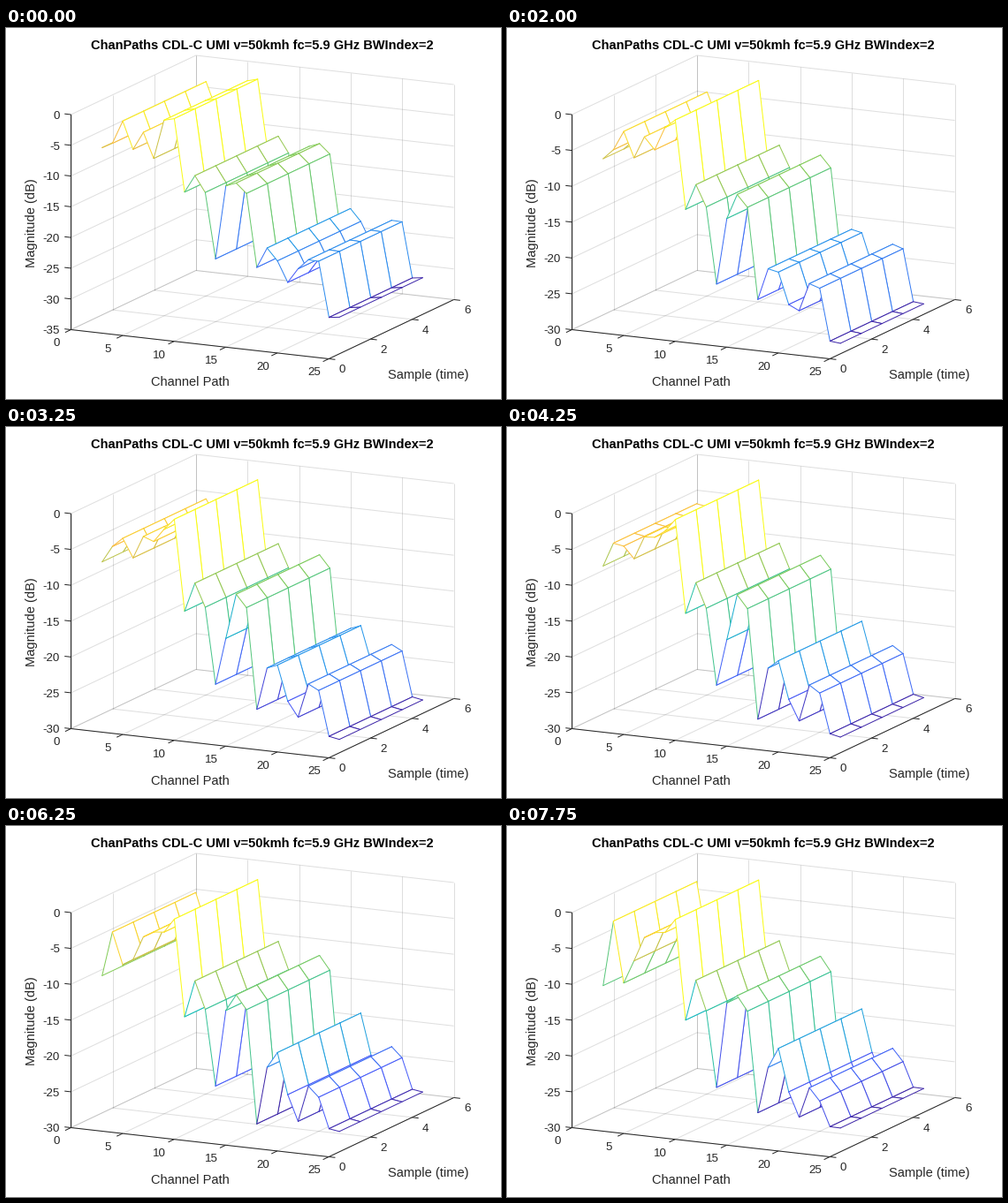
Recreate the animation shown at these times as a matplotlib script. Size 560 by 420 pixels, loop 8 s.

```python
import numpy as np
import matplotlib.pyplot as plt
from matplotlib.animation import FuncAnimation
from matplotlib.collections import LineCollection, PolyCollection
from matplotlib.colors import LinearSegmentedColormap

W, H, DPI = 560, 420, 100
FRAMES, STEP_MS = 32, 250
PX = 72 / DPI
INK = "#262626"
plt.rcParams["font.family"] = "Liberation Sans"

# Oblique axes: screen position of the origin and of one unit along each axis
ORIGIN = np.array([73.0, 341.0])
X_UNIT = np.array([291.7, 33.0]) / 25
Y_UNIT = np.array([141.4, -67.0]) / 6
Z_HEIGHT = 243.5
TICK = 7.3

PARULA = LinearSegmentedColormap.from_list("parula", [
    "#3e26a8", "#475bf9", "#2797eb", "#12beb9", "#81cc59", "#fbbc3d", "#f9fb15"])

# Gain of each path in dB at the start, and its drift over the loop
START = np.array([-6.8, -5.9, -2.1, -6.5, -3.55, -7.6, -1.2, -0.75,
                  -12.5, -9.65, -12.2, -22.8, -10.5, -10.1, -11.6, -23.3,
                  -20.1, -22, -25.3, -22.9, -21.25, -21.3, -30.25, -30.02])
DRIFT = np.array([-4.6, 3.65, -8.6, -0.95, -0.5, 4.4, -1.8, -0.3,
                  -2.4, 0.45, -1.1, -1, -1.2, -0.6, -1.1, -0.7,
                  -0.1, 4.6, 2, -3.75, -1.15, -2.8, 2.75, 2.5])
# Paths that arc away from a straight drift: height at mid loop
BOW = {1: 0.8, 2: -1.3, 3: 1.4, 6: 1.5, 7: -0.5, 18: 0.5, 20: -2.1, 23: 0.4}
# Paths that pass through a deep fade: centre, width, depth
FADE = {13: (0.485, 0.19, 6), 16: (0.72, 0.27, 4.6)}

PATHS = np.arange(1, 25)
SAMPLES = np.arange(1, 6)


def gains(u):
    """Gains in dB at loop position u in 0..1."""
    db = START + DRIFT * u
    for p, height in BOW.items():
        db[p - 1] += height * 4 * u * (1 - u)
    for p, (centre, width, depth) in FADE.items():
        db[p - 1] -= depth * np.exp(-((u - centre) / width) ** 2 / 2)
    return db


def project(x, y, height=0.0):
    """Screen point; height runs from 0 at the floor to 1 at the top."""
    return ORIGIN + x * X_UNIT + y * Y_UNIT - np.array([0, height * Z_HEIGHT])


def along(point, direction):
    return [point, point + TICK * direction / np.hypot(*direction)]


fig = plt.figure(figsize=(W / DPI, H / DPI), dpi=DPI, facecolor="white")
ax = fig.add_axes([0, 0, 1, 1])
ax.set_xlim(-0.5, W - 0.5)
ax.set_ylim(H - 0.5, -0.5)
ax.axis("off")


def label(x, y, text, px=13.33, ha="left", **kw):
    kw = {"color": INK, **kw}
    return ax.text(x, y, text, fontsize=px * PX, ha=ha, va="baseline",
                   rotation_mode="anchor", **kw)


def lines(segments, zorder, **kw):
    return ax.add_collection(LineCollection(
        segments, colors=INK, linewidths=PX, zorder=zorder, **kw))


# Fixed grid, axes and ticks
grid, ticks = [], []
for x in range(0, 26, 5):
    grid += [[project(x, 0), project(x, 6)], [project(x, 6), project(x, 6, 1)]]
    foot = project(x, 0)
    ticks.append(along(foot, -Y_UNIT))
    label(foot[0] - 16.5, foot[1] + 19, str(x), ha="center")
for y in range(0, 7, 2):
    grid += [[project(0, y), project(25, y)], [project(0, y), project(0, y, 1)]]
    foot = project(25, y)
    ticks.append(along(foot, X_UNIT))
    label(foot[0] + 11.5, foot[1] + 16, str(y))
lines(grid, 1, alpha=0.15)
lines(ticks, 2)
lines([[project(0, 0, 1), project(0, 0), project(25, 0), project(25, 6)]], 2)

z_grid = lines([], 1, alpha=0.15)
z_ticks = lines([], 2)
z_labels = [label(60.5, 0, str(-5 * i), ha="right") for i in range(8)]

label(289.5, 24, "ChanPaths CDL-C UMI v=50kmh fc=5.9 GHz BWIndex=2", 14.67,
      "center", color="black", weight="bold")
label(208, 405, "Channel Path", 14.67, "center")
label(477.5, 397, "Sample (time)", 14.67, "center")
label(33, 220.5, "Magnitude (dB)", 14.67, "center", rotation=90)

mesh = PolyCollection([], closed=False, linewidths=PX, zorder=3,
                      capstyle="round", joinstyle="round")
ax.add_collection(mesh)


def draw_z_axis(floor):
    walls, marks = [], []
    for i, text in enumerate(z_labels):
        level = 1 + 5 * i / floor
        text.set_visible(level > -0.01)
        if level < -0.01:
            continue
        walls.append([project(0, 0, level), project(0, 6, level),
                      project(25, 6, level)])
        foot = project(0, 0, level)
        marks.append(along(foot, -X_UNIT))
        text.set_y(foot[1] + 4.8)
    z_grid.set_segments(walls)
    z_ticks.set_segments(marks)


def draw_mesh(db, floor):
    level = 1 - db / floor
    shade = PARULA((db - db.min()) / (db.max() - db.min()))
    clear, white = (1, 1, 1, 0), (1, 1, 1, 1)
    shapes, fills, edges = [], [], []

    def add(points, fill, edge):
        shapes.append(points)
        fills.append(fill)
        edges.append(edge)

    # Back to front, so nearer faces hide what lies behind them
    for s in SAMPLES[-2::-1]:
        for i, p in enumerate(PATHS[:-1]):
            a, b = project(p, s, level[i]), project(p + 1, s, level[i + 1])
            c, d = b + Y_UNIT, a + Y_UNIT
            add([a, b, c, d], white, clear)
            add([d, c], clear, shade[i])
            add([b, c], clear, shade[i + 1])
            add([a, d], clear, shade[i])
            add([a, b], clear, shade[i])
    mesh.set_verts(shapes, closed=False)
    mesh.set_facecolor(fills)
    mesh.set_edgecolor(edges)


def update(n):
    db = gains(n / (FRAMES - 1))
    floor = 5 * np.floor(db.min() / 5)
    draw_z_axis(floor)
    draw_mesh(db, floor)
    return [mesh, z_grid, z_ticks, *z_labels]


anim = FuncAnimation(fig, update, frames=FRAMES, interval=STEP_MS,
                     init_func=lambda: update(0), repeat=True,
                     repeat_delay=0, blit=False)
plt.show()
```
